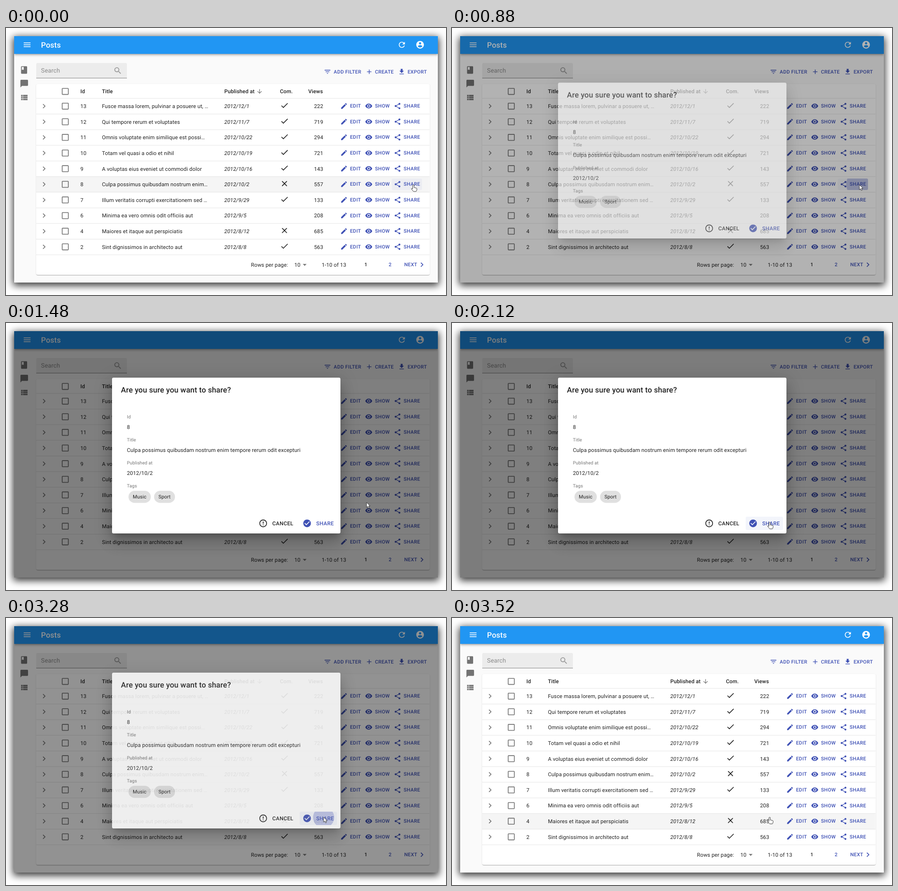
An HTML page for the animation above (4.16 s loop, 917x557 px).

```html
<!DOCTYPE html>
<html lang="en">
<head>
<meta charset="utf-8">
<title>Posts</title>
<style>
html, body { margin: 0; width: 100%; height: 100%; overflow: hidden; background: #fff; }
div, svg { position: absolute; }
svg, #dialog { left: 0; top: 0; width: 917px; height: 557px; }
#win { left: 17px; top: 17px; width: 883px; height: 514px; background: #fafafa;
  box-shadow: 0 4px 15px 2px rgba(0,0,0,.8); }
#bar { left: 17px; top: 17px; width: 883px; height: 37px; background: #2196f3;
  box-shadow: 0 1.6px 3px -.8px rgba(0,0,0,.2), 0 3px 4px rgba(0,0,0,.14), 0 1px 8px rgba(0,0,0,.12);
  clip-path: inset(0 0 -14px 0); }
#card { left: 63px; top: 117px; width: 819.5px; height: 397.5px; background: #fff; border-radius: 3px;
  box-shadow: 0 1.6px .8px -.8px rgba(0,0,0,.2), 0 .8px .8px rgba(0,0,0,.14), 0 .8px 2.4px rgba(0,0,0,.12); }
#shade { left: 17px; top: 17px; width: 883px; height: 514px; background: rgba(0,0,0,.5); }
#paper { left: 220.5px; top: 113.5px; width: 476px; height: 325px; background: #fff; border-radius: 3.2px;
  box-shadow: 0 9px 12px -5.5px rgba(0,0,0,.2), 0 19px 30px 2.4px rgba(0,0,0,.14), 0 7px 36px 6px rgba(0,0,0,.12); }
text { font: 400 11.09px Roboto, sans-serif; letter-spacing: .01071em; fill: rgba(0,0,0,.87);
  white-space: pre; text-rendering: geometricPrecision; }
.head { font-weight: 500; }
.date { font-style: italic; }
.big { font-size: 15.85px; font-weight: 500; letter-spacing: .0075em; }
.white { fill: #fff; }
.hint { font-size: 12.67px; letter-spacing: .00938em; fill: rgba(0,0,0,.42); }
.label { font-size: 9.5px; letter-spacing: .00938em; fill: rgba(0,0,0,.54); }
.chip { font-size: 10.3px; }
.btn { font-size: 10.3px; font-weight: 500; letter-spacing: .02857em; fill: #3f51b5; }
.act { font-weight: 500; letter-spacing: .02857em; }
.blue { fill: #3f51b5; }
.dark { fill: rgba(0,0,0,.87); }
.grey { fill: rgba(0,0,0,.54); }
</style>
</head>
<body>
<div id="win"></div>
<div id="bar"></div>
<div id="card"></div>
<svg id="page">
  <clipPath id="rowClip"><rect x="804" y="314" width="63" height="24" rx="3"/></clipPath>
</svg>
<div id="shade"></div>
<div id="dialog">
  <div id="paper"></div>
  <svg id="form">
    <clipPath id="okClip"><rect x="612" y="404" width="78" height="28" rx="3"/></clipPath>
  </svg>
</div>
<svg id="top"></svg>
<script>
const $ = id => document.getElementById(id);
const page = $('page'), form = $('form'), topLayer = $('top');
const GREY = 'rgba(0,0,0,.54)', BLUE = '#3f51b5';

const icons = {
  menu: 'M3 18h18v-2H3v2zm0-5h18v-2H3v2zm0-7v2h18V6H3z',
  refresh: 'M17.65 6.35C16.2 4.9 14.21 4 12 4c-4.42 0-7.99 3.58-7.99 8s3.57 8 7.99 8c3.73 0 6.84-2.55 7.73-6h-2.08c-.82 2.33-3.04 4-5.65 4-3.31 0-6-2.69-6-6s2.69-6 6-6c1.66 0 3.14.69 4.22 1.78L13 11h7V4l-2.35 2.35z',
  user: 'M12 2C6.48 2 2 6.48 2 12s4.48 10 10 10 10-4.48 10-10S17.52 2 12 2zm0 3c1.66 0 3 1.34 3 3s-1.34 3-3 3-3-1.34-3-3 1.34-3 3-3zm0 14.2c-2.5 0-4.71-1.28-6-3.22.03-1.99 4-3.08 6-3.08 1.99 0 5.97 1.09 6 3.08-1.29 1.94-3.5 3.22-6 3.22z',
  book: 'M18 2H6c-1.1 0-2 .9-2 2v16c0 1.1.9 2 2 2h12c1.1 0 2-.9 2-2V4c0-1.1-.9-2-2-2zM6 4h5v8l-2.5-1.5L6 12V4z',
  chat: 'M20 2H4c-1.1 0-2 .9-2 2v18l4-4h14c1.1 0 2-.9 2-2V4c0-1.1-.9-2-2-2z',
  list: 'M4 14h4v-4H4v4zm0 5h4v-4H4v4zM4 9h4V5H4v4zm5 5h12v-4H9v4zm0 5h12v-4H9v4zM9 5v4h12V5H9z',
  search: 'M15.5 14h-.79l-.28-.27C15.41 12.59 16 11.11 16 9.5 16 5.91 13.09 3 9.5 3S3 5.91 3 9.5 5.91 16 9.5 16c1.61 0 3.09-.59 4.23-1.57l.27.28v.79l5 4.99L20.49 19l-4.99-5zm-6 0C7.01 14 5 11.99 5 9.5S7.01 5 9.5 5 14 7.01 14 9.5 11.99 14 9.5 14z',
  filter: 'M10 18h4v-2h-4v2zM3 6v2h18V6H3zm3 7h12v-2H6v2z',
  add: 'M19 13h-6v6h-2v-6H5v-2h6V5h2v6h6v2z',
  load: 'M19 9h-4V3H9v6H5l7 7 7-7zM5 18v2h14v-2H5z',
  down: 'M20 12l-1.41-1.41L13 16.17V4h-2v12.17l-5.58-5.59L4 12l8 8 8-8z',
  next: 'M10 6L8.59 7.41 13.17 12l-4.58 4.59L10 18l6-6z',
  box: 'M19 5v14H5V5h14m0-2H5c-1.1 0-2 .9-2 2v14c0 1.1.9 2 2 2h14c1.1 0 2-.9 2-2V5c0-1.1-.9-2-2-2z',
  yes: 'M9 16.2L4.8 12l-1.4 1.4L9 19 21 7l-1.4-1.4L9 16.2z',
  no: 'M19 6.41L17.59 5 12 10.59 6.41 5 5 6.41 10.59 12 5 17.59 6.41 19 12 13.41 17.59 19 19 17.59 13.41 12z',
  edit: 'M3 17.25V21h3.75L17.81 9.94l-3.75-3.75L3 17.25zM20.71 7.04c.39-.39.39-1.02 0-1.41l-2.34-2.34c-.39-.39-1.02-.39-1.41 0l-1.83 1.83 3.75 3.75 1.83-1.83z',
  eye: 'M12 4.5C7 4.5 2.73 7.61 1 12c1.73 4.39 6 7.5 11 7.5s9.27-3.11 11-7.5c-1.73-4.39-6-7.5-11-7.5zM12 17c-2.76 0-5-2.24-5-5s2.24-5 5-5 5 2.24 5 5-2.24 5-5 5zm0-8c-1.66 0-3 1.34-3 3s1.34 3 3 3 3-1.34 3-3-1.34-3-3-3z',
  share: 'M18 16.08c-.76 0-1.44.3-1.96.77L8.91 12.7c.05-.23.09-.46.09-.7s-.04-.47-.09-.7l7.05-4.11c.54.5 1.25.81 2.04.81 1.66 0 3-1.34 3-3s-1.34-3-3-3-3 1.34-3 3c0 .24.04.47.09.7L8.04 9.81C7.5 9.31 6.79 9 6 9c-1.66 0-3 1.34-3 3s1.34 3 3 3c.79 0 1.5-.31 2.04-.81l7.12 4.16c-.05.21-.08.43-.08.65 0 1.61 1.31 2.92 2.92 2.92s2.92-1.31 2.92-2.92-1.31-2.92-2.92-2.92z',
  caret: 'M7 10l5 5 5-5z',
  alert: 'M11 15h2v2h-2zm0-8h2v6h-2zm.99-5C6.47 2 2 6.48 2 12s4.47 10 9.99 10C17.52 22 22 17.52 22 12S17.52 2 11.99 2zM12 20c-4.42 0-8-3.58-8-8s3.58-8 8-8 8 3.58 8 8-3.58 8-8 8z',
  done: 'M12 2C6.48 2 2 6.48 2 12s4.48 10 10 10 10-4.48 10-10S17.52 2 12 2zm-2 15l-5-5 1.41-1.41L10 14.17l7.59-7.59L19 8l-9 9z'
};

function add(parent, tag, attrs, label) {
  const el = document.createElementNS('http://www.w3.org/2000/svg', tag);
  for (const key in attrs) el.setAttribute(key, attrs[key]);
  if (label) el.textContent = label;
  return parent.appendChild(el);
}
const text = (parent, x, y, label, cls = '', anchor = 'start') =>
  add(parent, 'text', { x, y, class: cls, 'text-anchor': anchor }, label);
const rect = (parent, x, y, width, height, fill, rx = 0) =>
  add(parent, 'rect', { x, y, width, height, fill, rx });
// x, y mark the centre of the 24-unit icon grid
const icon = (parent, name, x, y, cls, size = 19) =>
  add(parent, 'path', { d: icons[name], class: cls,
    transform: `translate(${x} ${y}) scale(${size / 24}) translate(-12 -12)` });
const ripple = (parent, cx, cy, clip) =>
  add(parent, 'circle', { cx, cy, r: 0, fill: BLUE, 'clip-path': `url(#${clip})` });

// App bar and side menu
icon(page, 'menu', 44, 35, 'white');
text(page, 73, 40.8, 'Posts', 'big white');
const refresh = icon(page, 'refresh', 825, 35, 'white');
const spinner = add(page, 'circle', { cx: 825, cy: 35, r: 7, fill: 'none', stroke: '#fff',
  'stroke-width': 1.7, 'stroke-linecap': 'round' });
icon(page, 'user', 863, 35, 'white');
icon(page, 'book', 37.7, 87.7, 'grey');
icon(page, 'chat', 38, 116, 'grey');
icon(page, 'list', 37.8, 145, 'grey');

// Toolbar
add(page, 'path', { d: 'M63 105V76q0-3 3-3H249q3 0 3 3V105z', fill: '#ececec' });
rect(page, 63, 104, 189, 1, 'rgba(0,0,0,.42)');
text(page, 73, 93.3, 'Search', 'hint');
icon(page, 'search', 233, 89, 'grey').setAttribute('opacity', .65);
[['filter', 670, 'ADD FILTER', 683], ['add', 757, 'CREATE', 769], ['load', 824.6, 'EXPORT', 837]]
  .forEach(([name, x, label, tx]) => {
    icon(page, name, x, 91.3, 'blue', 15.84);
    text(page, tx, 95, label, 'btn');
  });

// Table
const ROW = 32.62, FIRST = 163;
const hover = rect(page, 63, 0, 819.5, ROW, '#f5f5f5');
const rowButton = rect(page, 804, 314, 63, 24, 'rgba(63,81,181,.045)', 3);
const rowRipple = ripple(page, 849.5, 326, 'rowClip');
icon(page, 'box', 123.5, 132.3, 'grey');
[[155, 'Id'], [200, 'Title'], [455, 'Published at'], [571, 'Com.'], [630, 'Views']]
  .forEach(([x, label]) => text(page, x, 136.2, label, 'head'));
icon(page, 'down', 528.5, 132.3, 'grey', 14.3);
rect(page, 63, 146.4, 819.5, .8, '#e0e0e0');

const posts = [
  [13, 'Fusce massa lorem, pulvinar a posuere ut, …', '2012/12/1', 'yes', 222],
  [12, 'Qui tempore rerum et voluptates', '2012/11/7', 'yes', 719],
  [11, 'Omnis voluptate enim similique est possi…', '2012/10/22', 'yes', 294],
  [10, 'Totam vel quasi a odio et nihil', '2012/10/19', 'yes', 721],
  [9, 'A voluptas eius eveniet ut commodi dolor', '2012/10/16', 'yes', 143],
  [8, 'Culpa possimus quibusdam nostrum enim…', '2012/10/2', 'no', 557],
  [7, 'Illum veritatis corrupti exercitationem sed …', '2012/9/29', 'yes', 133],
  [6, 'Minima ea vero omnis odit officiis aut', '2012/9/5', '', 208],
  [4, 'Maiores et itaque aut perspiciatis', '2012/8/12', 'no', 685],
  [2, 'Sint dignissimos in architecto aut', '2012/8/8', 'yes', 563]
];
posts.forEach(([id, title, date, com, views], i) => {
  const y = FIRST + i * ROW, base = y + 4.1;
  rect(page, 63, y + 16.1, 819.5, .8, '#e0e0e0');
  icon(page, 'next', 79.3, y, 'grey');
  icon(page, 'box', 123.5, y, 'grey');
  text(page, 155, base, id);
  text(page, 200, base, title);
  text(page, 455, base, date, 'date');
  if (com) icon(page, com, 580.4, y - 1.5, 'dark');
  text(page, 661, base, views, '', 'end');
  [['edit', 704.4, 'EDIT', 717], ['eye', 756, 'SHOW', 769], ['share', 816, 'SHARE', 828.8]]
    .forEach(([name, x, label, tx]) => {
      icon(page, name, x, y - .2, 'blue', 15.84);
      text(page, tx, y + 3.2, label, 'btn');
    });
});

// Pagination
text(page, 510.5, 497.6, 'Rows per page:');
text(page, 601, 497.6, '10');
icon(page, 'caret', 622.5, 493.8, 'grey');
text(page, 658, 497.6, '1-10 of 13');
text(page, 747, 497.2, '1', 'btn dark').style.fill = 'rgba(0,0,0,.87)';
text(page, 797.5, 497.2, '2', 'btn');
text(page, 830, 497.2, 'NEXT', 'btn');
icon(page, 'next', 866.8, 493.8, 'blue');

// Dialog
text(form, 239.5, 144.5, 'Are you sure you want to share?', 'big');
[['Id', '8'], ['Title', 'Culpa possimus quibusdam nostrum enim tempore rerum odit excepturi'],
 ['Published at', '2012/10/2'], ['Tags', '']].forEach(([name, value], i) => {
  text(form, 252, 199 + i * 48, name, 'label');
  if (value) text(form, 252, 221 + i * 48, value);
});
[[255.3, 46.5, 'Music'], [308.6, 43.6, 'Sport']].forEach(([x, w, label]) => {
  rect(form, x, 350, w, 25.3, '#e0e0e0', 12.65);
  text(form, x + w / 2, 366.3, label, 'chip', 'middle');
});
const okButton = rect(form, 612, 404, 78, 28, 'rgba(63,81,181,.06)', 3);
const okRipple = ripple(form, 662, 416, 'okClip');
icon(form, 'alert', 536, 418, 'dark');
text(form, 555, 422, 'CANCEL', 'act');
icon(form, 'done', 627.5, 418, 'blue');
text(form, 646.5, 422, 'SHARE', 'act').style.fill = BLUE;

// Pointer
const click = add(topLayer, 'circle', { r: 10, fill: '#ffeb3b' });
const ink = { fill: '#fff', stroke: '#333', 'stroke-width': .9, 'stroke-linejoin': 'round' };
const hand = add(topLayer, 'path', { ...ink,
  d: 'M-1.4 .8q1.4-1.6 2.8 0v5l4.6 1.1q1.6.5 1.4 2.2l-.8 3.6q-.3 1.3-1.6 1.3h-4q-1 0-1.7-.9l-3.6-4.8q.9-1.5 2.9.2z' });
const arrow = add(topLayer, 'path', { ...ink, d: 'M0 0V10.4L2.4 8.2 4 12 5.9 11.2 4.3 7.5H7.6z' });

// Each step keeps whatever it does not override
const steps = [
  { t: 0, open: 0, x: 849, y: 327, hand: 1, row: 5, rowBtn: 1, okBtn: 0, click: 0, rr: 0, ra: 0, okr: 0, oka: 0, spin: 0 },
  { t: 640, click: .75 },
  { t: 720, click: .35, rr: 5, ra: .25 },
  { t: 760, click: 0, rr: 10, ra: .27, row: -1, hand: 0 },
  { t: 880, open: .6, rr: 28, ra: .3 },
  { t: 920, open: .96, rr: 38, ra: .3, spin: .1, turn: 45 },
  { t: 1000, open: 1, rr: 60, ra: .12, spin: 10, turn: 110 },
  { t: 1080, ra: 0, rowBtn: 0, spin: 22, turn: 190 },
  { t: 1160, spin: 0 },
  { t: 1720, x: 688, y: 405, hand: 1, okBtn: 1 },
  { t: 1800, x: 655, y: 411 },
  { t: 1880, x: 632, y: 414 },
  { t: 1960, x: 626, y: 415 },
  { t: 2040, x: 646, y: 415 },
  { t: 2120, x: 662, y: 415.5 },
  { t: 3120, click: .75 },
  { t: 3200, click: .35, okr: 10, oka: .25 },
  { t: 3280, click: 0, open: .85, okr: 22, oka: .3, hand: 0 },
  { t: 3360, open: .45, okr: 30 },
  { t: 3440, open: .08, okr: 50, oka: .15 },
  { t: 3520, open: 0, oka: 0, okBtn: 0, row: 8, hand: 1 }
];

function stateAt(t) {
  const s = {};
  for (const step of steps) if (step.t <= t) Object.assign(s, step);
  if (t >= 1240 && t < 1720) {
    const k = (Math.floor((t - 1240) / 80) + 1) / 7, e = k * k * (3 - 2 * k);
    s.x += (688 - s.x) * e;
    s.y += (405 - s.y) * e;
  }
  return s;
}

const set = (el, attrs) => { for (const key in attrs) el.setAttribute(key, attrs[key]); };

function draw(now) {
  const s = stateAt(now % 4160);
  $('shade').style.opacity = s.open;
  $('dialog').style.opacity = s.open;
  set(hover, { y: FIRST + s.row * ROW - 16.3, opacity: s.row < 0 ? 0 : 1 });
  set(rowButton, { opacity: s.rowBtn });
  set(okButton, { opacity: s.okBtn });
  set(rowRipple, { r: s.rr, opacity: s.ra });
  set(okRipple, { r: s.okr, opacity: s.oka });
  set(refresh, { opacity: s.spin ? 0 : 1 });
  set(spinner, { opacity: s.spin ? 1 : 0, 'stroke-dasharray': `${s.spin} 60`,
    transform: `rotate(${s.turn || 0} 825 35)` });
  set(click, { cx: s.x, cy: s.y, opacity: s.click });
  const move = `translate(${s.x} ${s.y})`;
  set(hand, { transform: move, opacity: s.hand ? 1 : 0 });
  set(arrow, { transform: move, opacity: s.hand ? 0 : 1 });
}

const start = performance.now();
function tick() {
  draw(performance.now() - start);
  requestAnimationFrame(tick);
}
tick();
</script>
</body>
</html>
```
